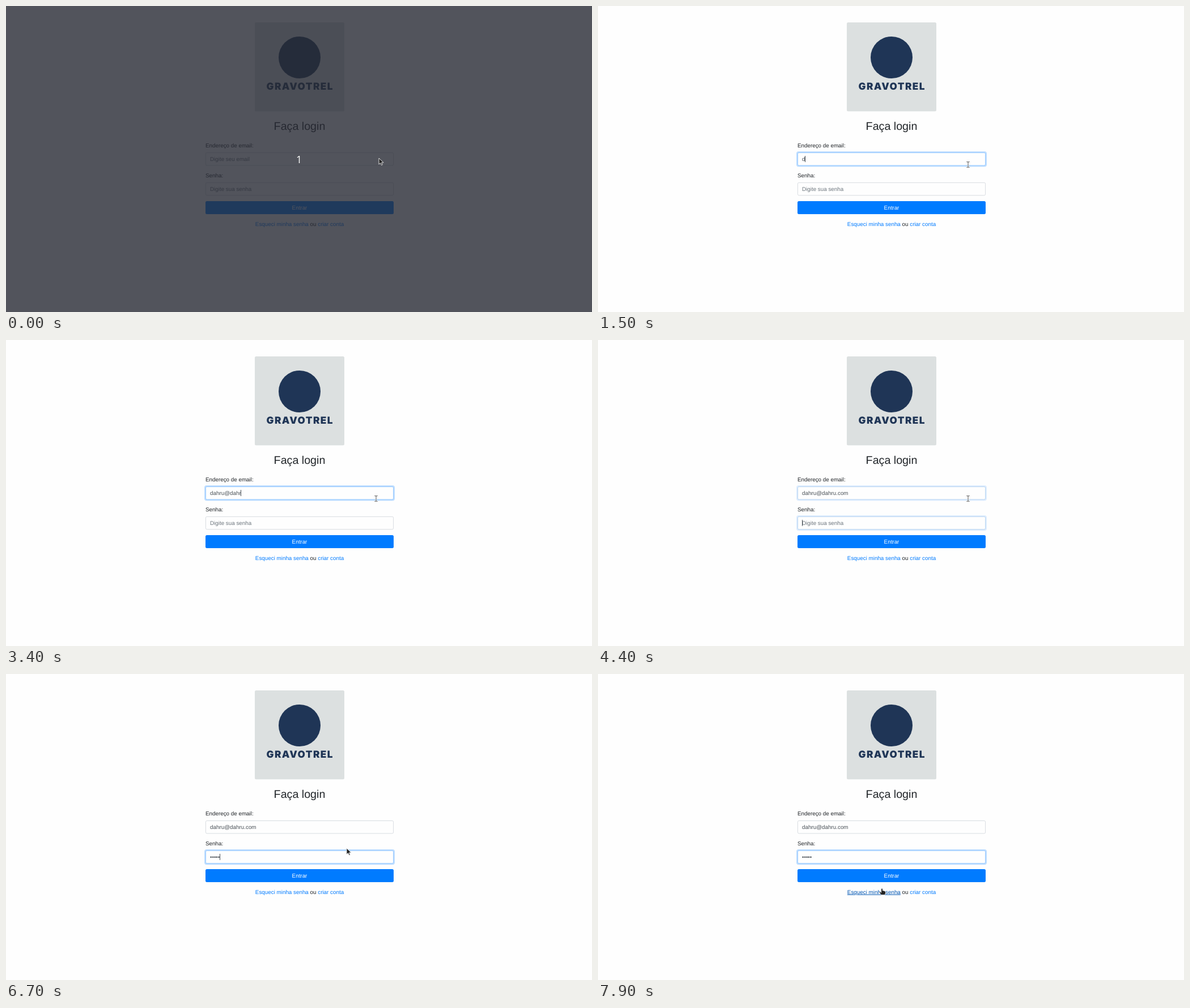
Write an HTML page that moves like this. It is 1034x541 px and loops after 8 s.

```html
<!DOCTYPE html>
<html lang="pt-BR">
<head>
<meta charset="utf-8">
<title>Login</title>
<style>
  html, body { margin: 0; width: 100%; height: 100%; overflow: hidden; background: #fefefe; }
  svg { display: block; width: 1034px; height: 541px; }
  text { font: 9.84px "Liberation Sans", Arial, sans-serif; fill: #212529; text-rendering: geometricPrecision; white-space: pre; }
  .mid { text-anchor: middle; }
  .title { font-size: 19.68px; }
  .brand { font: 900 17.2px Inter, sans-serif; fill: #1f3556; letter-spacing: 1.4px; }
  .hint { fill: #6c757d; }
  .value { fill: #495057; }
  .link { fill: #007bff; }
  .link.over { fill: #0056b3; text-decoration: underline; }
  .count { font: 18.5px "Noto Sans", sans-serif; fill: #fff; stroke: #33363d; stroke-width: 1px; paint-order: stroke; }
</style>
</head>
<body>
<svg viewBox="0 0 1034 541">
  <rect width="1034" height="541" fill="#fefefe"/>
  <rect x="439" y="29" width="158" height="157.2" rx="2.5" fill="#dce0e0"/>
  <circle cx="518" cy="91" r="37" fill="#1f3556"/>
  <text class="mid brand" x="518.7" y="148.2">GRAVOTREL</text>

  <text class="mid title" x="518" y="219.4">Faça login</text>
  <text x="352" y="249.8">Endereço de email:</text>
  <text x="352" y="302.7">Senha:</text>
  <g id="fields"></g>

  <rect id="button" x="352" y="345" width="332" height="23.1" rx="2.5"/>
  <text class="mid" x="518" y="359.8" style="fill:#fff">Entrar</text>
  <text class="mid" x="518" y="388.7"><tspan id="forgot" class="link">Esqueci minha senha</tspan> ou <tspan class="link">criar conta</tspan></text>

  <g id="countdown">
    <rect width="1034" height="541" fill="rgb(39,42,52)" fill-opacity=".8"/>
    <text class="mid count" x="517" y="277.5">1</text>
  </g>

  <g id="cursor">
    <path id="arrow" d="M0 0V11L2.6 8.6L4.5 12.5L6.3 11.7L4.5 7.9H8.2Z" fill="#222" stroke="#eee" stroke-width=".9"/>
    <g id="beam" fill="none">
      <path d="M-2.6 -4.9H-1L0 -4.3L1 -4.9H2.6M0 -4.5V4.5M-2.6 4.9H-1L0 4.3L1 4.9H2.6" stroke="#fff" stroke-width="2.2"/>
      <path d="M-2.6 -4.9H-1L0 -4.3L1 -4.9H2.6M0 -4.5V4.5M-2.6 4.9H-1L0 4.3L1 4.9H2.6" stroke="#555"/>
    </g>
    <path id="hand" d="M-1.3 .3Q0 -1.6 1.3 .3V3.4Q2.4 2.7 3.3 3.8Q4.4 3.3 5 4.5Q6.4 4.3 6.4 6V8.2L5.2 10.8H-1.2L-4.6 6.7Q-4.7 5 -3 5.6L-1.3 6.8Z" fill="#222" stroke="#eee" stroke-width=".8"/>
  </g>
</svg>
<script>
const LOOP = 8000;
const $ = id => document.getElementById(id);

// Last row of [time, ...values] that has begun
const at = (rows, t) => rows.reduce((hit, row) => row[0] <= t ? row : hit);
const within = (spans, t) => spans.some(([from, to]) => t >= from && t < to);
const mix = (a, b, k) => `rgb(${a.map((v, i) => Math.round(v + (b[i] - v) * k))})`;

const fields = [
  {
    top: 259, hint: 'Digite seu email', value: 'dahru@dahru.com',
    keys: [1500, 1600, 1800, 2000, 2100, 2600, 3000, 3100, 3200, 3400, 3500, 3700, 3900, 4100, 4200],
    caret: [[800, 1300], [1500, 4400]],
    focus: [[0, 0], [800, .3], [900, .9], [1000, 1], [4400, .5], [4500, 0]]
  },
  {
    top: 311.9, hint: 'Digite sua senha', value: '•••••',
    keys: [5100, 5200, 5400, 5600, 5700],
    caret: [[4400, 5000], [5100, 6200], [6700, 7300], [7800, 7900]],
    focus: [[0, 0], [4400, .5], [4500, 1]]
  }
];

const pointer = [
  [0, 658, 269, 'arrow'], [100, 660.3, 270.4, 'beam'],
  [800, 657, 274, 'beam'], [900, 654, 279, 'beam'], [1000, 653, 280.4, 'beam'],
  [6500, 649, 282, 'beam'], [6600, 629, 294, 'arrow'], [6700, 601, 308, 'arrow'],
  [6800, 572, 322, 'beam'], [6900, 545, 338, 'arrow'], [7000, 523, 346, 'hand'],
  [7100, 513, 347.5, 'hand'], [7200, 508, 348.3, 'hand'], [7300, 507.5, 348.6, 'hand'],
  [7500, 507, 353, 'hand'], [7600, 505, 361, 'hand'], [7700, 503.5, 370, 'arrow'],
  [7800, 502, 377, 'arrow'], [7900, 501, 379.6, 'hand']
];
const hover = [[0, 0], [7000, .5], [7100, 1], [7700, .5], [7800, 0]];

function add(tag, attrs) {
  const el = document.createElementNS('http://www.w3.org/2000/svg', tag);
  for (const key in attrs) el.setAttribute(key, attrs[key]);
  return $('fields').appendChild(el);
}

for (const f of fields) {
  f.glow = add('rect', { x: 350, y: f.top - 2, width: 336, height: 27.3, rx: 4, fill: '#007bff' });
  f.box = add('rect', { x: 352.4, y: f.top + .4, width: 331.2, height: 22.5, rx: 2.2, fill: '#fefefe', 'stroke-width': .8 });
  f.text = add('text', { x: 360, y: f.top + 14.8 });
  f.bar = add('rect', { y: f.top + 6, width: 1, height: 11, fill: '#495057' });
}

function drawField(f, t) {
  const typed = f.keys.filter(k => k <= t).length;
  const focus = at(f.focus, t)[1];
  f.text.textContent = typed ? f.value.slice(0, typed) : f.hint;
  f.text.setAttribute('class', typed ? 'value' : 'hint');
  f.glow.setAttribute('fill-opacity', focus * .25);
  f.box.setAttribute('stroke', mix([206, 212, 218], [128, 189, 255], focus));
  f.bar.setAttribute('x', Math.floor(360 + (typed ? f.text.getComputedTextLength() : 0)));
  f.bar.style.display = within(f.caret, t) ? '' : 'none';
}

function draw(t) {
  fields.forEach(f => drawField(f, t));
  $('countdown').style.display = t < 100 ? '' : 'none';
  $('button').setAttribute('fill', mix([0, 123, 255], [0, 105, 217], at(hover, t)[1]));
  $('forgot').setAttribute('class', t >= 7900 ? 'link over' : 'link');
  const [, x, y, shape] = at(pointer, t);
  $('cursor').setAttribute('transform', `translate(${x} ${y})`);
  for (const id of ['arrow', 'beam', 'hand']) $(id).style.display = id === shape ? '' : 'none';
}

const start = performance.now();
function tick() {
  draw((performance.now() - start) % LOOP);
  requestAnimationFrame(tick);
}
tick();
</script>
</body>
</html>
```
